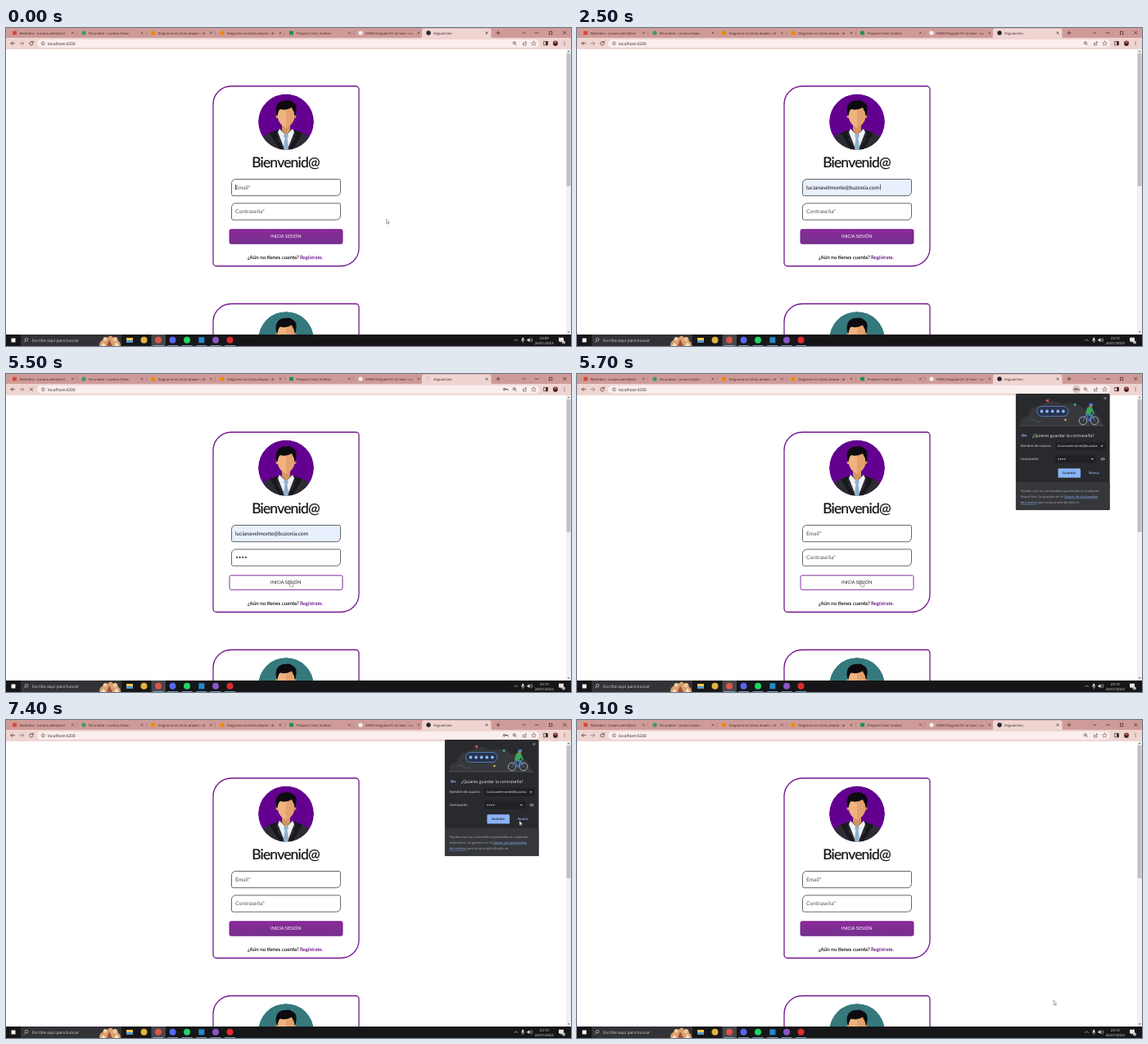
An HTML page for the animation above (9.2 s loop, 690 by 388 pixels).

```html
<!DOCTYPE html>
<html lang="es">
<head>
<meta charset="utf-8">
<title>AngularUno</title>
<style>
html, body { margin: 0; width: 100%; height: 100%; overflow: hidden; background: #fff; }
svg { display: block; width: 100vw; height: 100vh; }
text { font-family: "Open Sans", sans-serif; text-rendering: geometricPrecision; white-space: pre; }
.form text { font-family: Lato, sans-serif; }
.mid { text-anchor: middle; }
.ln { fill: none; stroke-linecap: round; stroke-linejoin: round; }
.card { fill: #fff; stroke: #74178e; stroke-width: 1.3; }
.box { stroke: #333; stroke-width: .75; }
</style>
</head>
<body>
<svg id="stage" viewBox="0 0 690 388" preserveAspectRatio="none"></svg>
<script>
const LOOP = 9200;
const MAIL = 'lucianavelmonte@buzonia.com', MAIL2 = 'luciana.velm@nolits.es';

const text = (x, y, size, fill, str, more = '') =>
  `<text x="${x}" y="${y}" font-size="${size}" fill="${fill}" ${more}>${str}</text>`;
const rect = (x, y, w, h, fill, more = '') =>
  `<rect x="${x}" y="${y}" width="${w}" height="${h}" fill="${fill}" ${more}/>`;
const dot = (x, y, r, fill, more = '') => `<circle cx="${x}" cy="${y}" r="${r}" fill="${fill}" ${more}/>`;
const shape = (d, fill, more = '') => `<path d="${d}" fill="${fill}" ${more}/>`;
const line = (d, stroke, w = .6, more = '') =>
  `<path class="ln" d="${d}" stroke="${stroke}" stroke-width="${w}" ${more}/>`;
const group = (id, body) => `<g id="${id}">${body}</g>`;

// Box with wide top-left / bottom-right corners and tight other ones
const leaf = (x, y, w, h, big, small) =>
  `M${x + big} ${y}H${x + w - small}a${small} ${small} 0 0 1 ${small} ${small}V${y + h - big}` +
  `a${big} ${big} 0 0 1 ${-big} ${big}H${x + small}a${small} ${small} 0 0 1 ${-small} ${-small}V${y + big}` +
  `a${big} ${big} 0 0 1 ${big} ${-big}z`;

const cross = (x, y, r, color, w) =>
  line(`M${x - r} ${y - r}l${2 * r} ${2 * r}m0 ${-2 * r}l${-2 * r} ${2 * r}`, color, w);
const key = (x, y, color) =>
  `<circle class="ln" cx="${x - 1.4}" cy="${y}" r="1.3" stroke="${color}" stroke-width=".8"/>` +
  line(`M${x} ${y}h2.8v1.1`, color, .9);

function avatar(dy, back, id) {
  return `<g transform="translate(0 ${dy})"><clipPath id="${id}"><circle cx="342" cy="114.5" r="34"/></clipPath>` +
    `<g clip-path="url(#${id})">` + dot(342, 114.5, 34, back) +
    shape('M311 150L314 135Q316 130 322 128L334 124H350L362 128Q368 130 370 135L373 150z', '#2c2c33') +
    shape('M334 123L342 131L350 123L352 127L343 150H341L332 127z', '#eef1f5') +
    shape('M337 116H347V125L342 131L337 125z', '#d59460') +
    shape('M340 129.500H344L345 132L343.500 134L345.500 149H338.500L340.500 134L339 132z', '#8fb2cc') +
    shape('M333 124L330 130L333 133L331 135L341 150H335L322 128z', '#18181d') +
    shape('M351 124L354 130L351 133L353 135L343 150H349L362 128z', '#18181d') +
    dot(331.5, 108, 2, '#e8a671') + dot(352.5, 108, 2, '#d59460') +
    shape('M332 101Q332 95 342 95Q352 95 352 101V110Q351 117 342 122Q333 117 332 110z', '#efb280') +
    shape('M342 95Q352 95 352 101V110Q351 117 342 122z', '#e3a26d') +
    shape('M331 108Q328 99 331 94Q334 88 342 88.500Q346 87 351 91Q357 94 353 108L351.500 102Q350 100 349 97Q342 101 335 99Q333 100 332.500 103z', '#0d0b10') +
    '</g></g>';
}

function browser() {
  const tabs = [
    ['Recibidos - luciana.velm@nol', '#d8453a'], ['Mi unidad - Lumbra Nube', '#3b9b62'],
    ['Diagrama sin título.drawio - dr', '#f08705'], ['Diagrama sin título.drawio - dr', '#f08705'],
    ['Proyecto final: Análisis', '#1e9152'], ['DWEC/Angular/A1 at main · Lu', '#f5f0f0']];
  let s = rect(0, 0, 690, 13, '#cf9b98') + rect(0, 12, 690, 14, '#efd5d2') +
    shape('M505 12.500Q508 12.500 508 10V3Q508 .5 510.500 .5H590Q592.500 .5 592.500 3V10Q592.500 12.500 595.500 12.500z', '#efd5d2');
  tabs.forEach(([name, color], i) => {
    const x = 8 + i * 84.5;
    s += (i % 4 ? dot(x + 2.5, 6, 2.6, color) : rect(x, 3.7, 5, 4.600, color)) +
      text(x + 8.5, 7.6, 4.1, '#3d2625', name) + cross(x + 73.4, 6, 1.2, '#4a302f', .55);
    if (i < 5) s += rect(x + 78.5, 3, .4, 6, '#97696a');
  });
  s += dot(516, 6, 2.7, '#26232a', 'id="favicon"') +
    line('M514 5.800a2.200 2.200 0 0 1 2.200 -2.200', '#b88b89', .7, 'id="spinner"') +
    text(522, 7.6, 4.1, '#2c1c1c', 'AngularUno') + cross(587, 6, 1.2, '#2c1c1c', .6) +
    line('M599 6h4M601 4v4M630.500 5l1.800 1.800l1.800 -1.800M646 6h4.500M680.500 4l3.600 3.600m0 -3.600l-3.600 3.600', '#2c1c1c', .65) +
    rect(663.3, 4.2, 3.6, 3.6, 'none', 'stroke="#2c1c1c" stroke-width=".6"');
  // Toolbar
  s += rect(38, 14, 613, 9.8, '#faefee', 'rx="4.900"') +
    line('M10.500 18.700H6m2 -2l-2 2l2 2', '#4b3433', .75) + line('M17 18.700h4.500m-2 -2l2 2l-2 2', '#8e7170', .75) +
    group('reload', line('M32.800 17.500a2.200 2.200 0 1 0 .3 1.800M33.200 16v1.800h-1.800', '#4b3433', .75)) +
    group('stop', cross(31, 18.7, 1.7, '#4b3433', .75)) +
    dot(45.3, 18.8, 2.1, 'none', 'stroke="#5b4544" stroke-width=".55"') + line('M45.300 18.600v1.200M45.300 17.700v.1', '#5b4544') +
    text(51, 20.5, 5, '#30201f', 'localhost:4200') +
    group('halo', dot(610, 18.7, 5, '#dcc5c3')) + group('key', key(610, 18.6, '#4b3433')) +
    dot(620.8, 18.2, 1.7, 'none', 'stroke="#5b4544" stroke-width=".6"') + line('M622.100 19.500l1.500 1.600M620 18.200h1.600', '#5b4544') +
    line('M631.500 18v3h3.500v-1.500M632.500 19.400q.4 -2 2.800 -2m-1 -1.200l1.200 1.200l-1.200 1.200', '#5b4544') +
    line('M644.500 16l.8 1.800l2 .2l-1.500 1.300l.5 2l-1.800 -1.100l-1.800 1.100l.5 -2l-1.500 -1.300l2 -.2z', '#5b4544', .5) +
    rect(656.8, 16.3, 4.6, 4.6, 'none', 'stroke="#2c1c1c" stroke-width=".6"') + rect(659.2, 16.3, 2.2, 4.6, '#2c1c1c') +
    dot(671, 18.7, 3.1, '#7a3a35') + shape('M669.300 21.200q0 -3 1.700 -3t1.700 3z', '#2d1516') + dot(671, 17.4, 1, '#c89076') +
    [16.7, 18.6, 20.5].map(y => dot(682, y, .5, '#2c1c1c')).join('');
  // Scrollbar
  s += rect(684, 26, 6, 348, '#f1f1f1') + rect(684.600, 31, 4.9, 162, '#c1c1c1') +
    shape('M685.500 29.300l1.600 -1.800l1.600 1.800z', '#6b6b6b') + shape('M685.500 370.300l1.600 1.800l1.600 -1.800z', '#6b6b6b');
  return s;
}

function form() {
  return '<g class="form">' +
    `<path class="card" d="${leaf(253, 71, 178, 219.5, 22, 4)}"/>` +
    `<path class="card" d="${leaf(253, 336.5, 178, 219.5, 22, 4)}"/>` +
    avatar(0, '#64008f', 'face1') + avatar(265.5, '#35797c', 'face2') +
    text(341.5, 169.7, 17.5, '#111', 'Bienvenid@', 'class="mid" letter-spacing="-.8" stroke="#111" stroke-width=".2"') +
    `<path id="mail" class="box" d="${leaf(275.5, 184.5, 133, 20.2, 5, 2)}"/>` +
    `<path id="pass" class="box" fill="#fff" d="${leaf(275.5, 213.9, 133, 20.2, 5, 2)}"/>` +
    group('mailHint', text(280, 196.8, 6.7, '#555', 'Email*')) +
    group('mailText', text(280, 196.8, 6.6, '#111', MAIL)) +
    group('passHint', text(280, 226, 6.7, '#555', 'Contraseña*')) +
    [0, 1, 2, 3].map(i => dot(282 + i * 3.6, 223.8, .95, '#111', `id="dot${i}"`)).join('') +
    rect(280.2, 190.7, .6, 7, '#111', 'id="caret"') +
    `<linearGradient id="violet" x2="0" y2="1"><stop stop-color="#8b2a99"/><stop offset="1" stop-color="#74308c"/></linearGradient>` +
    rect(273, 245.8, 138, 17.4, 'url(#violet)', 'id="btn" rx="1.800" stroke="#74178e" stroke-width=".9"') +
    text(341.8, 256.2, 5.6, '#fff', 'INICIA SESIÓN', 'id="btnText" class="mid"') +
    text(295, 281.7, 6.2, '#111', '¿Aún no tienes cuenta?', 'stroke="#111" stroke-width=".1"') +
    text(359, 281.7, 6.1, '#6c0f88', 'Regístrate.', 'stroke="#6c0f88" stroke-width=".1"') + '</g>';
}

function dropdown() {
  return shape('M315.500 208.500l3.500 -3.500l3.500 3.500z', '#292a2d') + rect(311, 208, 78, 55.3, '#292a2d', 'rx="1"') +
    rect(311, 209.5, 78, 13, '#44464a', 'id="choice"') +
    [MAIL, MAIL2, 'user', 'fotolunas'].map((s, i) => text(315.5, 217.7 + i * 13, 4.35, '#f1f1f1', s)).join('');
}

function popup() {
  const gray = '#a4a8ad', blue = '#8ab4f8';
  const wheel = x => dot(x, 57, 4.800, 'none', 'stroke="#d5d8dc" stroke-width=".7"');
  let s = rect(535.5, 24, 115.5, 142.3, '#000', 'rx="2" opacity=".25"') + rect(536, 24, 114.5, 142, '#292a2d', 'rx="1.500"') +
    rect(536, 132, 114.5, 34, '#36373b') + cross(645, 29.5, 1.3, '#d0d2d5', .6) +
    shape('M541 63Q541 52 551 51Q553 39 567 38Q579 29 592 37Q608 32 617 42Q636 43 643 63z', '#36383c') +
    line('M541 63H644', '#5f6368', .6) +
    rect(561.5, 39.5, 38.5, 12, '#27344d', 'rx="6" stroke="#6e93d6" stroke-width=".7"');
  for (let i = 0; i < 5; i++) s += dot(567.5 + i * 6.600, 45.5, 1.9, blue);
  s += shape('M572 32.500l4 -2v4z', '#e8564a') + rect(607, 36, 2.6, 2.6, '#4bb56b', 'transform="rotate(20 608 37)"') +
    dot(596.5, 56, 1.2, '#f6c445') + line('M551 57q4 -4 8 0t8 0', '#5f6368') +
    wheel(618) + wheel(632) + line('M618 57l4 -7h7l3 7M622 50l3 7l4 -7', '#5e93ee', .8) +
    line('M624 48l4 3l-2 6', '#4477cf', 2) + shape('M621 49l2 -8q3 -2 6 0l1 3l-4 6z', '#3ba55d') +
    line('M628 42l3 5l-1 2', '#3ba55d', 1.5) + dot(627.5, 38.7, 2.1, '#bd7b5a') + shape('M625 38.500q.5 -3 3 -3t2.500 2.500z', '#3a7bd5');
  s += key(546, 75, blue) + text(556, 77.3, 5.05, '#eceef0', '¿Quieres guardar la contraseña?') +
    text(541.5, 89.4, 4.1, '#e3e5e8', 'Nombre de usuario') + text(541.5, 105, 4.1, '#e3e5e8', 'Contraseña') +
    rect(584, 83, 62, 10, '#202124', 'rx="1"') + rect(584, 98.6, 50, 10, '#202124', 'rx="1"') +
    text(587, 89.4, 3.95, '#e3e5e8', MAIL.slice(0, 23)) +
    shape('M639.500 87.300h3l-1.500 1.700z', '#d0d2d5') + shape('M627.800 103h3l-1.500 1.700z', '#d0d2d5');
  for (let i = 0; i < 4; i++) s += dot(588.2 + i * 2.5, 103.7, .75, '#e3e5e8');
  s += shape('M639.300 103.700q2.800 -3.600 5.600 0q-2.800 3.600 -5.600 0z', gray) + dot(642.1, 103.7, 1, '#292a2d') +
    rect(587.5, 115.2, 27.5, 11.4, blue, 'rx="1.200"') +
    text(601.2, 122.4, 4.1, '#202124', 'Guardar', 'class="mid" font-weight="600"') +
    text(631.3, 122.4, 4.1, blue, 'Nunca', 'class="mid" font-weight="600"') +
    text(541.5, 143.5, 3.95, gray, 'Puedes usar las contraseñas guardadas en cualquier') +
    text(541.5, 150.7, 3.95, gray, `dispositivo. Se guardan en el <tspan fill="${blue}" text-decoration="underline">Gestor de contraseñas</tspan>`) +
    text(541.5, 157.9, 3.95, gray, `<tspan fill="${blue}" text-decoration="underline">de Lumbra</tspan> para ${MAIL2}`);
  return s;
}

function taskbar() {
  const light = '#e6e6e6';
  let s = rect(0, 374, 690, 14, '#161618') + rect(6.5, 378.5, 5, 5, '#f2f2f2') + rect(18, 374, 123, 14, '#333337') +
    dot(25, 380.2, 1.8, 'none', `stroke="${light}" stroke-width=".6"`) + line('M23.700 381.600l-1.800 1.900', light) +
    text(32, 382.7, 5, '#cfcfcf', 'Escribe aquí para buscar') +
    shape('M114 388q0 -6 4 -7q2 -6 6 -3q4 -5 7 0q5 -3 6 4q3 1 3 6z', '#d9a06c') +
    dot(121, 379.5, 2.3, '#f0cfa6') + dot(133, 379.8, 2.6, '#efc499') + shape('M123 388l3 -8l4 8z', '#9c4f38') +
    shape('M116 388l3 -4l3 4zM132 388l3 -5l3 5z', '#f4e2c8') +
    rect(177.5, 374, 17.5, 14, '#47474b') +
    rect(147, 378, 8, 5.6, '#f4c64f') + rect(147, 381, 8, 2.6, '#4a9be0');
  [[168.5, '#e3b23c'], [186, '#db5646'], [203.5, '#5865f2'], [221, '#1ed760'], [256, '#8a56c9'], [273.5, '#e02b2b']]
    .forEach(([x, c]) => s += dot(x, 380.8, 4, c));
  s += rect(235.3, 377.3, 7, 7, '#2489ca');
  for (const x of [186, 203.5, 221, 238.7, 256, 273.5]) s += rect(x - 6.5, 387.2, 13, .8, '#8db4d8');
  s += line('M620.700 381.700l1.900 -1.900l1.900 1.900', light) + rect(630.2, 377.7, 2, 3.8, light, 'rx="1"') +
    line('M629.300 380.500q0 2 1.900 2t1.900 -2M631.200 382.500v1.500', light, .5) +
    shape('M636.500 379.800h1.300l1.700 -1.500v5l-1.700 -1.500h-1.300z', light) + line('M640.700 379.400q1.200 1.400 0 2.800M642 378.400q2 2.400 0 4.800', light, .5) +
    text(657.2, 379.8, 4.3, light, '', 'id="clock" class="mid"') + text(657.2, 386.1, 4.3, light, '26/01/2023', 'class="mid"') +
    shape('M675 377.800h6v4.700h-2l-1.500 1.500v-1.500h-2.500z', light) + dot(681, 383.5, 1.9, '#d0d0d0') +
    text(681, 384.7, 3, '#222', '2', 'class="mid"');
  return s;
}

stage.innerHTML = rect(0, 0, 690, 388, '#fff') + form() + group('menu', dropdown()) + browser() +
  group('popup', popup()) + taskbar() +
  group('cursor',
    shape('M0 0V5.600L1.300 4.400L2.200 6.300L3.100 5.900L2.200 4H3.900z', '#fff', 'id="arrow" stroke="#444" stroke-width=".45"') +
    shape('M-.6 .3q.6 -.7 1.200 0v2.200l2.500 .6q.7 .3 .5 1.100l-.7 2.400h-3l-2 -2.700q.1 -.8 .9 -.5l.6 .6z', '#fff', 'id="hand" stroke="#444" stroke-width=".45"'));

const $ = id => document.getElementById(id);
const show = (id, on) => $(id).setAttribute('visibility', on ? 'visible' : 'hidden');
const set = (id, name, value) => $(id).setAttribute(name, value);

// time, x, y of the pointer tip
const path = [
  [0, 464.5, 233], [300, 455, 222], [700, 412, 197], [1000, 350, 195], [1700, 350, 195], [1800, 346, 214],
  [2300, 346, 214], [2600, 346, 222], [4300, 346, 224], [4800, 347.5, 253], [5900, 347.5, 253],
  [6500, 500, 190], [7000, 627, 123], [7600, 627, 123], [8000, 618, 170], [8400, 612, 205], [9000, 582, 342], [LOOP, 582, 342]];

function pointer(t) {
  const i = path.findIndex(p => p[0] > t), [t0, x0, y0] = path[i - 1], [t1, x1, y1] = path[i];
  const k = (t - t0) / (t1 - t0), e = k * k * (3 - 2 * k);
  return [x0 + (x1 - x0) * e, y0 + (y1 - y0) * e];
}

function draw(t) {
  const within = (a, b) => t >= a && t < b;
  const [x, y] = pointer(t);
  const overX = x > 273 && x < 411;
  const overMail = overX && y > 184 && y < 205, overPass = overX && y > 214 && y < 234;
  const overBtn = overX && y > 245 && y < 263;
  const filled = within(1900, 5600), focusPass = within(2800, 5200), loading = within(5200, 5600);
  const typed = [3400, 3700, 3900, 4100].filter(at => within(at, 5600)).length;

  set('cursor', 'transform', `translate(${x} ${y})`);
  show('arrow', !overBtn && !overMail && !(overPass && !within(1800, 1900)));
  show('hand', overBtn);

  set('mail', 'fill', filled ? '#e8f0fe' : '#fff');
  set('mail', 'style', overMail ? 'stroke:#9a4bb0' : '');
  set('pass', 'style', focusPass && overPass ? 'stroke:#9a4bb0' : '');
  show('mailHint', !filled);
  show('mailText', filled);
  show('passHint', !typed);
  for (let i = 0; i < 4; i++) show('dot' + i, i < typed);

  const caretX = focusPass ? 280.4 + typed * 3.6 : filled ? 370 : 280.2;
  const blink = t < 1100 ? t % 1000 < 500 : (t - 1900) % 1000 >= 500 || within(3400, 4200);
  set('caret', 'x', caretX);
  set('caret', 'y', focusPass ? 220 : 190.7);
  show('caret', blink && (t < 1100 || within(1900, 5200)));

  show('menu', within(1100, 1900));
  show('choice', within(1800, 1900));
  set('btn', 'fill', overBtn ? '#fff' : 'url(#violet)');
  set('btnText', 'fill', overBtn ? '#222' : '#fff');

  show('key', within(3400, 7600));
  show('halo', within(5600, 6500));
  show('popup', within(5600, 7600));
  show('reload', !loading);
  show('stop', loading);
  show('favicon', !loading);
  show('spinner', loading);
  set('spinner', 'transform', `rotate(${(t - 5500) * .9} 516 6)`);
  $('clock').textContent = t < 2000 ? '23:09' : '23:10';
}

const start = performance.now();
function tick() {
  draw(Math.floor((performance.now() - start) % LOOP / 100) * 100);
  requestAnimationFrame(tick);
}
tick();
</script>
</body>
</html>
```
